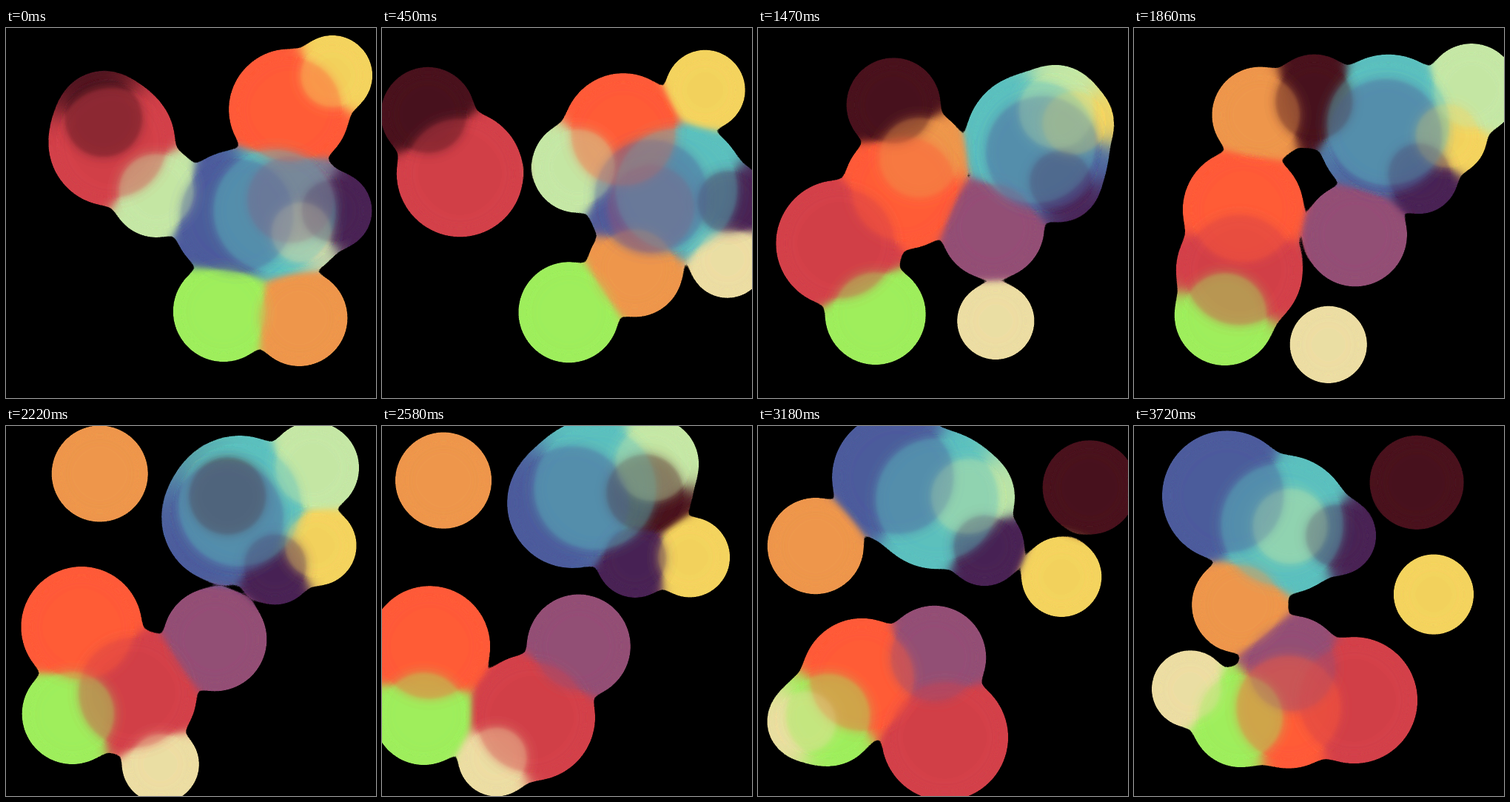
Recreate the animation shown at these times as an HTML page without scripts. Size 500x500 px, loop 3750 ms.

```html
<!DOCTYPE html>
<html lang="en">
<head>
<meta charset="utf-8">
<title>Gooey balls</title>
<style>
  html, body { margin: 0; width: 100%; height: 100%; overflow: hidden; background: #000; }
  svg { display: block; width: 500px; height: 500px; }
  /* The small addition makes up for the shrinking of curved edges under blur */
  circle {
    r: calc(var(--r) * 1px + 72px / var(--r));
    filter: var(--falloff);
    mix-blend-mode: plus-lighter;
  }
  .rim { --falloff: url(#rim-falloff); filter: url(#outline); }
  .core { --falloff: url(#core-falloff); filter: url(#core-fade); }
</style>
</head>
<body>
<svg viewBox="0 0 500 500">
  <defs>
    <!-- Each ball weighs fully inside and decays exponentially across its edge -->
    <filter id="rim-falloff" x="-.4" y="-.4" width="1.8" height="1.8" color-interpolation-filters="sRGB">
      <feGaussianBlur stdDeviation="12"/>
      <feComponentTransfer>
        <feFuncA type="table" tableValues="0 .0046 .0133 .0284 .0544 .1 .184 .353 .754 1 1"/>
      </feComponentTransfer>
    </filter>
    <filter id="core-falloff" x="-.4" y="-.4" width="1.8" height="1.8" color-interpolation-filters="sRGB">
      <feGaussianBlur stdDeviation="12"/>
      <feComponentTransfer>
        <feFuncA type="table" tableValues="0 .0004 .0012 .0025 .0048 .009 .016 .031 .067 .193 .24"/>
      </feComponentTransfer>
    </filter>

    <!-- Cuts the summed weights to a crisp merged outline -->
    <filter id="outline" filterUnits="userSpaceOnUse" x="0" y="0" width="500" height="500" color-interpolation-filters="sRGB">
      <feColorMatrix values="1 0 0 0 0  0 1 0 0 0  0 0 1 0 0  0 0 0 50 -4.5"/>
    </filter>
    <!-- Shows averaged colours where the weights are high -->
    <filter id="core-fade" filterUnits="userSpaceOnUse" x="0" y="0" width="500" height="500" color-interpolation-filters="sRGB">
      <feColorMatrix values="1 0 0 0 0  0 1 0 0 0  0 0 1 0 0  0 0 0 50 -3.1"/>
    </filter>

    <!-- Straight paths that bounce off the walls -->
    <g id="balls">
      <circle style="--r:94" fill="#5bc0be">
        <animate attributeName="cx" values="363;425;198" keyTimes="0;.215;1" dur="3.75s" repeatCount="indefinite"/>
        <animate attributeName="cy" values="247;73;135" keyTimes="0;.7365;1" dur="3.75s" repeatCount="indefinite"/>
      </circle>
      <circle style="--r:88" fill="#4c5b9c">
        <animate attributeName="cx" values="312;433;122.7" keyTimes="0;.2805;1" dur="3.75s" repeatCount="indefinite"/>
        <animate attributeName="cy" values="253.6;66;96" keyTimes="0;.863;1" dur="3.75s" repeatCount="indefinite"/>
      </circle>
      <circle style="--r:85.5" fill="#d34049">
        <animate attributeName="cx" values="143;65;300" keyTimes="0;.249;1" dur="3.75s" repeatCount="indefinite"/>
        <animate attributeName="cy" values="155;435;368" keyTimes="0;.807;1" dur="3.75s" repeatCount="indefinite"/>
      </circle>
      <circle style="--r:81.7" fill="#fe5a38">
        <animate attributeName="cx" values="383;60.5;212.4" keyTimes="0;.68;1" dur="3.75s" repeatCount="indefinite"/>
        <animate attributeName="cy" values="110;383" dur="3.75s" repeatCount="indefinite"/>
      </circle>
      <circle style="--r:70" fill="#934e75">
        <animate attributeName="cx" values="384.5;212" dur="3.75s" repeatCount="indefinite"/>
        <animate attributeName="cy" values="232;327.3" dur="3.75s" repeatCount="indefinite"/>
      </circle>
      <circle style="--r:68" fill="#9eee5c">
        <animate attributeName="cx" values="294;48;147" keyTimes="0;.713;1" dur="3.75s" repeatCount="indefinite"/>
        <animate attributeName="cy" values="383;393.2" dur="3.75s" repeatCount="indefinite"/>
      </circle>
      <circle style="--r:65" fill="#ee964b">
        <animate attributeName="cx" values="396.5;44;146.7" keyTimes="0;.774;1" dur="3.75s" repeatCount="indefinite"/>
        <animate attributeName="cy" values="392;42.5;246" keyTimes="0;.632;1" dur="3.75s" repeatCount="indefinite"/>
      </circle>
      <circle style="--r:63.5" fill="#49111c">
        <animate attributeName="cx" values="132;43.5;457;377.6" keyTimes="0;.152;.8635;1" dur="3.75s" repeatCount="indefinite"/>
        <animate attributeName="cy" values="122;76" dur="3.75s" repeatCount="indefinite"/>
      </circle>
      <circle style="--r:62" fill="#c5e7a5">
        <animate attributeName="cx" values="203;460;207" keyTimes="0;.504;1" dur="3.75s" repeatCount="indefinite"/>
        <animate attributeName="cy" values="221;40.5;137.5" keyTimes="0;.65;1" dur="3.75s" repeatCount="indefinite"/>
      </circle>
      <circle style="--r:54" fill="#f4d35e">
        <animate attributeName="cx" values="441;404.7" dur="3.75s" repeatCount="indefinite"/>
        <animate attributeName="cy" values="64;228.8" dur="3.75s" repeatCount="indefinite"/>
      </circle>
      <circle style="--r:53.3" fill="#492254">
        <animate attributeName="cx" values="441;469;272" keyTimes="0;.1245;1" dur="3.75s" repeatCount="indefinite"/>
        <animate attributeName="cy" values="247;147.6" dur="3.75s" repeatCount="indefinite"/>
      </circle>
      <circle style="--r:52" fill="#ecdda3">
        <animate attributeName="cx" values="399;470.5;30;80.4" keyTimes="0;.127;.91;1" dur="3.75s" repeatCount="indefinite"/>
        <animate attributeName="cy" values="276;467.5;353" keyTimes="0;.626;1" dur="3.75s" repeatCount="indefinite"/>
      </circle>
    </g>
  </defs>

  <g class="rim"><use href="#balls"/></g>
  <g class="core"><use href="#balls"/></g>
</svg>
</body>
</html>
```
